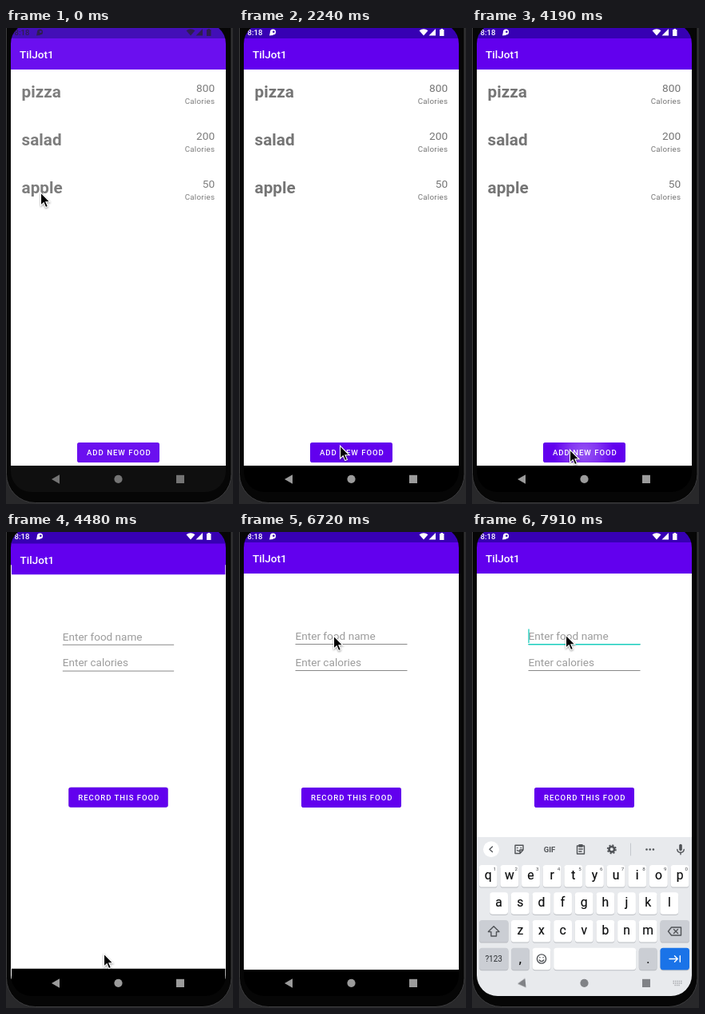
Recreate the animation shown at these times as an HTML page. Size 284 by 596 pixels, loop 8000 ms.

```html
<!DOCTYPE html>
<html lang="en">
<head>
<meta charset="utf-8">
<title>Food list</title>
<style>
html, body { margin: 0; width: 100%; height: 100%; overflow: hidden; background: #28282a; }
svg { display: block; width: 284px; height: 596px; font-family: Roboto, sans-serif; }
.title { font-size: 13.6px; font-weight: 500; fill: #fff; }
.food { font-size: 20.7px; font-weight: 700; fill: #757575; }
.count { font-size: 13.7px; fill: #757575; text-anchor: end; }
.unit { font-size: 9.8px; letter-spacing: .25px; fill: #757575; text-anchor: end; }
.button { fill: #6200ee; filter: drop-shadow(0 .6px .6px #0004); }
.label { font-size: 9.6px; font-weight: 500; letter-spacing: .97px; fill: #fff; }
.hint { font-size: 13.6px; fill: #9c9c9c; }
.key { font-size: 15.7px; fill: #0c0d0e; stroke: #0c0d0e; stroke-width: .2; text-anchor: middle; }
.digit { font-size: 6.2px; fill: #45484c; text-anchor: middle; }
.icon { fill: none; stroke: #505357; stroke-width: 1.4; stroke-linejoin: round; stroke-linecap: round; }
.window { transform-origin: 140.5px 290px; }

/* Every change is a hard step; 1% of the loop is 80 ms. */
.anim { animation: 8s step-end -10ms infinite; }
#cursor { animation-name: cursor; }
#list { animation-name: list; }
#form { animation-name: form; }
#ripple { animation-name: ripple; }
#flood { animation-name: flood; }
#focus { animation-name: focus; }
#keyboard { animation-name: keyboard; }
#nav { animation-name: nav; }
#back { animation-name: back; transform-origin: 63px 565px; }
#status { animation-name: status; }
#veil { animation-name: veil; }

@keyframes cursor {
  0% { transform: translate(43px, 206px); }
  1.875% { transform: translate(52px, 228px); }
  3.75% { transform: translate(76px, 256px); }
  5.625% { transform: translate(100px, 284px); }
  7.375% { transform: translate(116px, 304px); }
  9.25% { transform: translate(124px, 315px); }
  16.75% { transform: translate(131px, 447px); }
  18.625% { transform: translate(131px, 488px); }
  22.375% { transform: translate(134px, 503px); }
  24.25% { transform: translate(133px, 518px); }
  26.125% { transform: translate(130px, 529px); }
  28% { transform: translate(126px, 523px); }
  29.875% { transform: translate(122px, 500px); }
  31.75% { transform: translate(119px, 478px); }
  35.5% { transform: translate(121px, 507px); }
  37.375% { transform: translate(122px, 525px); }
  41.125% { transform: translate(122px, 527px); }
  43% { transform: translate(122px, 528px); }
  63.375% { transform: translate(121px, 300px); }
  65.25% { transform: translate(120px, 155px); }
  76.5% { transform: translate(120px, 151px); }
  78.375% { transform: translate(119px, 144px); }
  80.25% { transform: translate(118px, 137px); }
  82.125% { transform: translate(118px, 132px); }
  84% { transform: translate(118px, 130px); }
  97%, 100% { transform: translate(117px, 129px); }
}
@keyframes list {
  0% { transform: scale(1); }
  54.125% { transform: scale(1.004); }
  56% { transform: scale(1.045); }
  57.875%, 100% { transform: scale(1); }
}
@keyframes form {
  0% { visibility: hidden; }
  56% { visibility: visible; transform: scale(.995); }
  57.875%, 100% { visibility: visible; transform: none; }
}
@keyframes ripple {
  0% { visibility: hidden; }
  52.375% { visibility: visible; }
  54.125%, 100% { visibility: hidden; }
}
@keyframes flood {
  0% { visibility: hidden; }
  54.125% { visibility: visible; }
  56%, 100% { visibility: hidden; }
}
@keyframes focus {
  0% { visibility: hidden; }
  97%, 100% { visibility: visible; }
}
@keyframes keyboard {
  0% { visibility: hidden; }
  98.875%, 100% { visibility: visible; }
}
@keyframes nav {
  0% { fill: #6c6c6c; }
  1.875% { fill: #868686; }
  3.75% { fill: #9b9b9b; }
  98.875%, 100% { fill: #808286; }
}
@keyframes back {
  0% { transform: none; }
  98.875%, 100% { transform: rotate(-6deg); }
}
@keyframes status {
  0% { color: #211044; }
  1.875% { color: #9a86cc; }
  3.75%, 100% { color: #fff; }
}
@keyframes veil {
  0% { opacity: .06; }
  1.875% { opacity: .03; }
  3.75%, 100% { opacity: 0; }
}
</style>
</head>
<body>
<svg viewBox="0 0 284 596">
  <defs>
    <clipPath id="screen">
      <path d="M15 0A26 26 0 0 0 6 19.7V555A26 26 0 0 0 32 581H249A26 26 0 0 0 275 555V19.7A26 26 0 0 0 266 0Z"/>
    </clipPath>
    <radialGradient id="glow" gradientUnits="userSpaceOnUse" cx="140" cy="532" r="38">
      <stop offset="0" stop-color="#fff" stop-opacity=".34"/>
      <stop offset=".5" stop-color="#fff" stop-opacity=".2"/>
      <stop offset="1" stop-color="#fff" stop-opacity="0"/>
    </radialGradient>
    <g id="chrome">
      <path fill="#fff" d="M6 40H275V560H6z"/>
      <path fill="#6200ee" d="M6 0H275V52H6z"/>
      <path fill="#3700b3" d="M6-12H275V13H6z"/>
      <path d="M6 548H275V600H6z"/>
      <text class="title" x="17" y="38.3">TilJot1</text>
    </g>
  </defs>

  <rect x=".5" y="-40" width="281.5" height="634.5" rx="36" fill="#060606" stroke="#3c3c3e"/>

  <g clip-path="url(#screen)">
    <g id="list" class="window anim">
      <use href="#chrome"/>
      <g id="foods"></g>
      <rect class="button" x="89" y="519" width="103" height="25" rx="2.8"/>
      <rect id="ripple" class="anim" x="89" y="519" width="103" height="25" rx="2.8" fill="url(#glow)"/>
      <rect id="flood" class="anim" x="89" y="519" width="103" height="25" rx="2.8" fill="#fff" fill-opacity=".24"/>
      <text class="label" x="101" y="535.2">ADD NEW FOOD</text>
    </g>

    <g id="form" class="window anim">
      <use href="#chrome"/>
      <text class="hint" x="70.5" y="135">Enter food name</text>
      <text class="hint" x="70.5" y="167.5">Enter calories</text>
      <path stroke="#7c7c7c" stroke-width=".9" d="M70.5 140.5H210.5M70.5 173.5H210.5"/>
      <g id="focus" class="anim" stroke="#19cdbd">
        <path stroke-width="1.6" d="M70.5 140.7H210.5"/>
        <path stroke-width="1.3" d="M71 121.5V139"/>
      </g>
      <rect class="button" x="78" y="320" width="125" height="25" rx="2.8"/>
      <text class="label" x="90" y="336.2">RECORD THIS FOOD</text>
    </g>

    <g id="status" class="anim" fill="currentColor">
      <text x="10.5" y="9" font-size="9.6" font-weight="500">8:18</text>
      <circle cx="42.5" cy="5" r="3.6"/>
      <path d="M38 9.5L39 5L43 9z"/>
      <circle cx="43.3" cy="4.8" r="1.3" fill="#3700b3"/>
      <path d="M225.5 3.3Q231 -.8 236.5 3.3L231 9.6zM246 1V9.5H237.5zM251 2H252.5V1H255V2H256.5V10H251z"/>
    </g>

    <g id="keyboard" class="anim">
      <path fill="#e8eaed" d="M6 382H275V581H6z"/>
      <circle cx="24" cy="397.3" r="10" fill="#fff"/>
      <g class="icon">
        <path d="M25.5 394L22 397.3L25.5 400.6"/>
        <path d="M54 392.2H64V398L60 402.5H54zM64 398H60V402.5M56.5 395.5H57M61 395.5H61.5M56.5 398.5Q58 400 59.5 399"/>
        <path d="M131.5 393H140.5V403H131.5zM134 391.8H138V394H134zM133.8 397H138.2M133.8 400H137"/>
        <circle cx="174.8" cy="397.3" r="3.3" stroke-width="2.6"/>
        <circle cx="174.8" cy="397.3" r="5.1" stroke-width="1.8" stroke-dasharray="2 2" stroke-linecap="butt"/>
        <path stroke="#c4c7cc" stroke-width="1" d="M198.5 390V405"/>
        <path d="M256.8 397.5Q257 401.3 261 401.3Q265 401.3 265.2 397.5M261 401.3V403.8"/>
      </g>
      <text x="97" y="400.5" font-size="9.5" font-weight="700" fill="#505357" text-anchor="middle">GIF</text>
      <g fill="#505357">
        <circle cx="218.5" cy="397.5" r="1.3"/><circle cx="222.7" cy="397.5" r="1.3"/><circle cx="226.9" cy="397.5" r="1.3"/>
        <rect x="259.2" y="390.8" width="3.6" height="8.4" rx="1.8"/>
      </g>
      <g id="keys"></g>
      <g class="icon" stroke="#2c2f32">
        <path d="M27.2 493.8L34 500.6H30.5V506H23.9V500.6H20.4z"/>
        <path d="M249.5 495H261.5V505H249.5L245.5 500zM252.5 497.5L257.5 502.5M257.5 497.5L252.5 502.5"/>
        <circle cx="87" cy="534.5" r="5.6"/>
        <path d="M84.8 532.7H85M89 532.7H89.2M84.2 536Q87 539.2 89.8 536"/>
        <path stroke="#fff" d="M247 534.5H257M253.5 530.7L257.3 534.5L253.5 538.3M260.3 530.7V538.3"/>
      </g>
      <path stroke="#a4a7ab" stroke-width="1.4" stroke-dasharray="1.4 1" d="M251.5 562.5H262.5M251.5 565H262.5M253.5 567.5H260.5"/>
    </g>

    <g id="nav" class="anim">
      <path id="back" class="anim" d="M57 565L67 559.3V570.7z"/>
      <circle cx="140.5" cy="564.8" r="5.1"/>
      <path d="M213 559.8H223V570H213z"/>
    </g>
    <path id="veil" class="anim" fill="#fff" d="M6 0H275V581H6z"/>
  </g>

  <g id="cursor" class="anim">
    <path d="M.5 0V16.2L4.2 12.8L6.7 18.6L9.4 17.4L6.9 11.8H12z" stroke="#fff" stroke-width="1.1"
      style="filter: drop-shadow(0 1px 1px #0006)"/>
  </g>
</svg>
<script>
const text = (cls, x, y, value) => `<text class="${cls}" x="${x}" y="${y}">${value}</text>`;
const key = (x, y, width, fill = '#fff') =>
  `<rect x="${x}" y="${y + 1}" width="${width}" height="27.5" rx="3.6" fill="#b9bcc1"/>` +
  `<rect x="${x}" y="${y}" width="${width}" height="27.5" rx="3.6" fill="${fill}"/>`;
const fillGroup = (id, markup) => { document.getElementById(id).innerHTML = markup; };

const foods = [['pizza', 800], ['salad', 200], ['apple', 50]];
fillGroup('foods', foods.map(([name, calories], i) => {
  const y = 60 * i;
  return text('food', 19.6, 87.2 + y, name) + text('count', 261.2, 80.2 + y, calories) +
    text('unit', 261.3, 94.5 + y, 'Calories');
}).join(''));

const pitch = 26.65;
const rows = [['qwertyuiop', 20.2, 417], ['asdfghjkl', 33.6, 451.3], ['zxcvbnm', 60.3, 486]];
const letters = rows.flatMap(([chars, start, y], row) => [...chars].map((char, i) => {
  const x = start + i * pitch;
  const digit = row ? '' : text('digit', x + 8.3, y + 7, (i + 1) % 10);
  return key(x - 11.4, y, 22.8) + text('key', x, y + 18, char) + digit;
}));
const grey = '#cbced4';
const special = [
  key(9, 486, 36.5, grey), key(235.5, 486, 36.5, grey),
  key(9, 520.7, 36.5, grey), key(49, 520.7, 22.8, grey), key(75.6, 520.7, 22.8),
  key(102.2, 520.7, 103), key(208.8, 520.7, 22.8, grey), key(235.5, 520.7, 36.5, '#1a73e8'),
  '<text x="27.2" y="538" font-size="10" fill="#2c2f32" text-anchor="middle">?123</text>',
  text('key', 60.4, 539.6, ','), text('key', 220.2, 539.6, '.'),
];
fillGroup('keys', [...letters, ...special].join(''));
</script>
</body>
</html>
```
